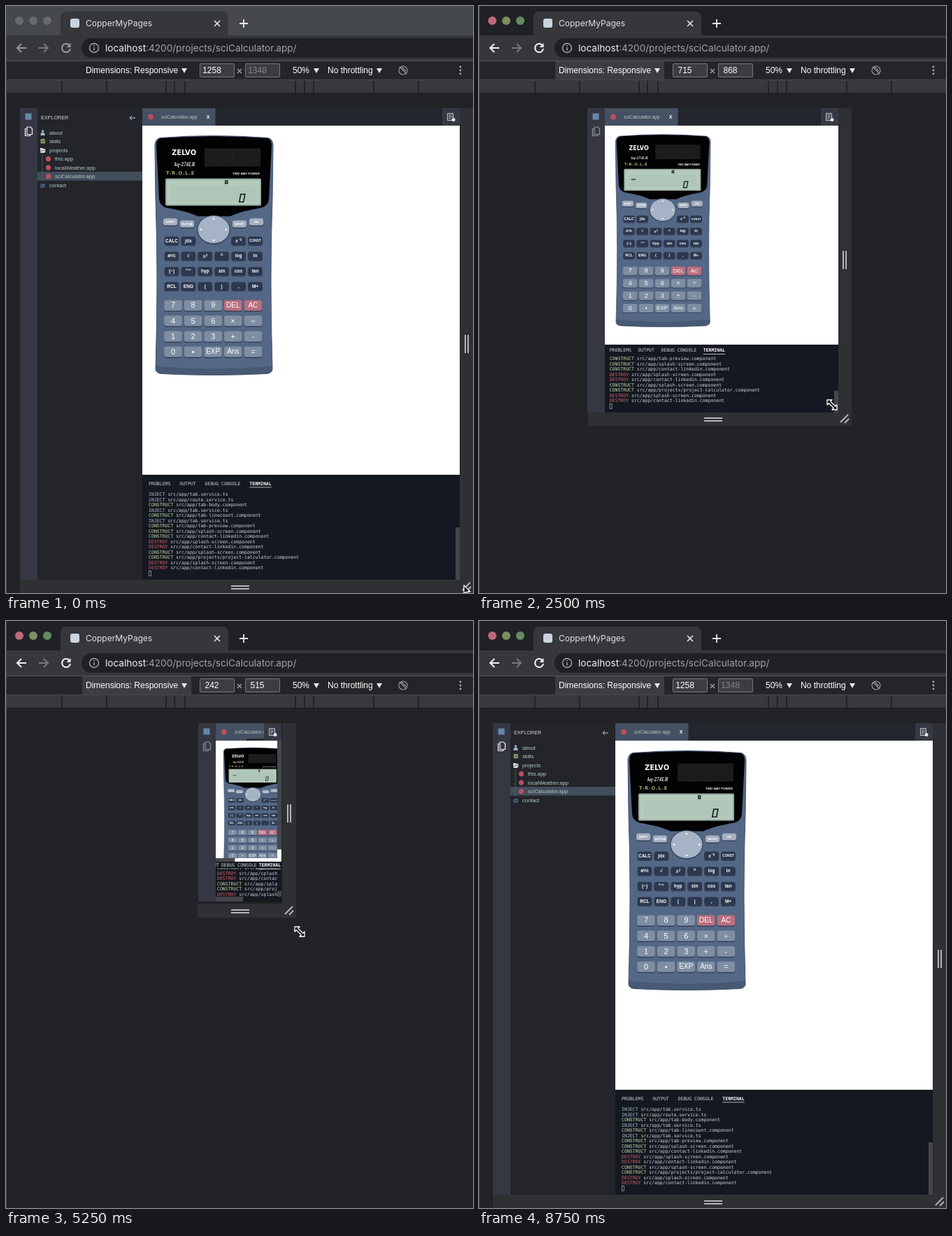
Animation of 668 by 839 pixels, one loop 9750 ms. Source, as an HTML page with a canvas:

```html
<!DOCTYPE html>
<html lang="en">
<head>
<meta charset="utf-8">
<style>
html, body { margin: 0; width: 668px; height: 839px; overflow: hidden; background: #222326; }
canvas { display: block; }
</style>
</head>
<body>
<canvas id="stage" width="668" height="839"></canvas>
<script>
const c = document.getElementById('stage').getContext('2d');
const LOOP = 9750, STEP = 250, TOP = 146, MID = 334.5;
const SANS = '"Liberation Sans", Arial, sans-serif';
const UI = 'Inter, sans-serif';
const MONO = '"DejaVu Sans Mono", monospace';

// time, viewport width, height, page lag, unpainted gap, layout offset x, y, pointer x, y
const KEYS = [
  [0, 1258, 1348, 0, 0, 0, 0, 660, 834],
  [1250, 1258, 1348, 0, 0, 0, 0, 659, 830],
  [1500, 1180, 1290, 0, 0, 0, 0, 632, 786],
  [2000, 858, 986, 0, 0, 0, 0, 545, 622],
  [2500, 715, 868, 2, 0, 0, 0, 505, 570],
  [3250, 470, 695, 5, 0, 0, 0, 450, 494],
  [3750, 360, 624, 2, 0, 0, 0, 424, 464],
  [4750, 205, 484, 0, 0, 0, 0, 396, 418],
  [5250, 242, 515, -3, 0, 0, 0, 420, 444],
  [6250, 631, 865, -8, 9, 8, 0, 515, 616],
  [7250, 1066, 1194, 0, 0, 8, 5, 631, 779],
  [7500, 1170, 1246, 0, 0, 8, 5, 654, 806],
  [7750, 1258, 1348, 0, 0, 0, 0, 680, 850]
];

const LOG = `I tab.service.ts|I route.service.ts|C tab-body.component|I tab.service.ts|C tab-linecount.component
I tab.service.ts|C tab-preview.component|C splash-screen.component|C contact-linkedin.component
D splash-screen.component|D contact-linkedin.component|C splash-screen.component
C projects/project-calculator.component|D splash-screen.component|D contact-linkedin.component`.split(/[|\n]/);
const WORDS = { I: ['INJECT', '#a9c4d0'], C: ['CONSTRUCT', '#c3d8a6'], D: ['DESTROY', '#d2606c'] };

function pose(t) {
  const i = KEYS.findIndex(k => k[0] > t);
  if (i < 0) return KEYS[KEYS.length - 1].slice(1);
  const a = KEYS[i - 1], b = KEYS[i], u = (t - a[0]) / (b[0] - a[0]);
  return a.map((v, n) => v + (b[n] - v) * u).slice(1);
}

function box(x, y, w, h, color, r = 0) {
  c.fillStyle = color;
  c.beginPath();
  c.roundRect(x, y, Math.max(0, w), Math.max(0, h), r);
  c.fill();
}

function oval(x, y, rx, ry, color) {
  c.fillStyle = color;
  c.beginPath();
  c.ellipse(x, y, rx, ry, 0, 0, 7);
  c.fill();
}

function line(d, color, width = 1) {
  c.strokeStyle = color;
  c.lineWidth = width;
  c.stroke(new Path2D(d));
}

function shape(d, color) {
  c.fillStyle = color;
  c.fill(new Path2D(d));
}

function text(s, x, y, font, color, align = 'left') {
  c.font = font;
  c.fillStyle = color;
  c.textAlign = align;
  c.textBaseline = 'middle';
  c.fillText(s, x, y);
}

function clipped(x, y, w, h, draw) {
  c.save();
  c.beginPath();
  c.rect(x, y, Math.max(0, w), Math.max(0, h));
  c.clip();
  draw();
  c.restore();
}

function browser(active, w, h) {
  box(0, 0, 668, 839, '#222326');
  box(0, 0, 668, 42, active ? '#202124' : '#46494c');
  const lights = active ? ['#bd6a7c', '#7c8f62', '#668a62'] : Array(3).fill('#686b6e');
  lights.forEach((color, i) => oval(19 + 20 * i, 21, 6, 6, color));
  box(78, 8, 240, 44, '#36373b', 8);
  box(0, 42, 668, 36, '#36373b');
  box(92, 18, 13, 13, '#c9d4de', 3);
  text('CopperMyPages', 114, 25, '12px ' + UI, '#dfe1e5');
  line('M298 21l8 8m0-8l-8 8', '#e8eaed', 1.6);
  line('M340 19v12m-6-6h12', '#e8eaed', 1.8);
  const on = active ? '#f1f3f4' : '#97999d';
  line('M29 60H16m6-6l-6 6l6 6', on, 2);
  line('M47 60h13m-6-6l6 6l-6 6', '#76787c', 2);
  line('M90.500 56A6 6 0 1 0 92 61', on, 2);
  shape('M92.500 53v6h-6z', on);
  box(108, 46, 580, 28, '#202124', 14);
  line('M132.500 60a6.500 6.500 0 1 0-13 0a6.500 6.500 0 1 0 13 0M126 59v4.500M126 56v1.500', '#a5a8ac', 1.4);
  text('localhost', 142, 60.5, '13.6px ' + UI, '#f1f3f4');
  text(':4200/projects/sciCalculator.app/', 142 + c.measureText('localhost').width, 60.5, '13.6px ' + UI, '#a0a3a8');

  box(0, 78, 668, 28, '#242528');
  if (active) box(109, 79, 156, 26, '#3b3d40');
  box(0, 78, 668, 1, '#55575b');
  box(0, 105, 668, 1, '#46484c');
  text('Dimensions: Responsive', 114, 92.5, '12px ' + SANS, '#fff');
  text('50%', 410, 92.5, '12px ' + SANS, '#fff');
  text('No throttling', 460, 92.5, '12px ' + SANS, '#fff');
  for (const x of [251, 440, 530]) shape(`M${x} 89h8l-4 7z`, '#e4e6e9');
  [[277, w], [342, h]].forEach(([x, n]) => {
    box(x, 82, 50, 20, '#75787c', 2);
    box(x + 1, 83, 48, 18, '#3b3d41', 1);
    text(Math.round(n), x + 17.5, 92.5, '12px ' + SANS, n === 1348 ? '#85878b' : '#fff', 'center');
  });
  line('M331 90l6 6m0-6l-6 6', '#a5a8ac', 1.2);
  line('M574 92a6 6 0 1 0-12 0a6 6 0 1 0 12 0M563 87l10 10M566 87l6 6', '#96999d', 1.2);
  for (const y of [87, 92, 97]) oval(650, y, 1.4, 1.4, '#a5a8ac');

  box(0, 106, 668, 18, '#38393d');
  for (const x of [80, 144, 229, 241, 256, 414, 427, 440, 526, 590]) box(x - 1, 107, 2, 17, '#222326');
  box(0, 124, 668, 1, '#1f2023');
  box(0, 0, 1, 839, '#414957');
}

function grips(left, right, bottom) {
  box(left, TOP, right - left + 20, bottom - TOP + 20, '#2f3033');
  box(left, TOP, right - left, bottom - TOP, '#1f2023');
  const y = (TOP + bottom) / 2 - 13, g = '#b4b6b9';
  box(right + 7, y, 2, 26, g);
  box(right + 11, y, 2, 26, g);
  box(322, bottom + 8, 26, 2, g);
  box(322, bottom + 12, 26, 2, g);
  line(`M${right + 4} ${bottom + 15}l11-11m-5 12l6-6`, g, 2);
}

function docs(x, y, color, bg) {
  line(`M${x - 3} ${y - 3}h-2v10h7v-2`, color, 1.2);
  box(x - 3, y - 6, 8, 11, bg);
  line(`M${x - 2.5} ${y - 5.500}h5l2.500 2.500v8h-7.500z`, color, 1.2);
}

function explorer(x) {
  const leaf = '7.5px ' + SANS, green = '#b4cdc0';
  text('EXPLORER', x + 5, 160.5, '7.2px ' + SANS, '#d3d7db');
  line(`M${x + 140} 160h-8m3-3l-3 3l3 3`, '#c8ccd0', 1);
  box(x, 237, 150, 12.5, '#434d5c');
  line(`M${x + 7} 212v38`, '#54585f', 1);
  oval(x + 7.5, 179, 1.8, 1.8, '#9ab3c9');
  box(x + 4.5, 181, 6, 4, '#9ab3c9', [2, 2, 0, 0]);
  box(x + 4.5, 190, 6.5, 6.5, '#7d9a68', 1);
  line(`M${x + 6} 193l1.500 1.500l2.500-3`, '#26302a', 0.8);
  shape(`M${x + 4} 203h3l1 1h3v2h-5l-2 3zM${x + 6} 206.500h6l-2 3.500h-6z`, '#d5d8db');
  text('@', x + 3.5, 256.5, '8px ' + SANS, '#6fa0cd');
  ['about', 'skills', 'projects', 'this.app', 'localWeather.app', 'sciCalculator.app', 'contact'].forEach((s, i) => {
    const y = 181.5 + 12.5 * i, nested = i > 2 && i < 6;
    text(s, x + (nested ? 25 : 17), y, leaf, green);
    if (nested) oval(x + 15.5, y - 0.5, 3.6, 3.8, '#b9505c');
  });
}

function key(s, x, y, w, h, color, font) {
  box(x - w / 2, y - h / 2 + 1.5, w, h, 'rgba(25,34,52,.55)', 3);
  box(x - w / 2, y - h / 2, w, h, color, 3);
  text(s, x, y + 0.4, font, '#fff', 'center');
}

function calculator(x, y, s, blink) {
  c.save();
  c.translate(x, y);
  c.scale(s, s);
  const body = 'M7 2Q84-4 162 2Q169 4 169 13L168 90Q164 200 168 332Q168 338 160 339Q84 343 9 339Q1 338 1 332Q5 200 1 90L0 13Q0 4 7 2Z';
  shape(body, '#546784');
  shape('M1 328Q84 336 168 328V332Q168 338 160 339Q84 343 9 339Q1 338 1 332Z', '#485974');
  line(body, '#43526d', 1);
  shape('M8 2.500Q84-3 161 2.500Q167 4 167 13L163 90Q162 99 152 102Q122 107 108 114H61Q47 107 17 102Q7 99 6 90L2 13Q2 4 8 2.500Z', '#020203');

  text('ZELVO', 24, 23.5, 'bold 10px "DejaVu Sans", sans-serif', '#f4f4f4');
  text('kq-274LR', 28, 41, 'italic bold 7.2px "Liberation Serif", serif', '#e3e3e3');
  c.letterSpacing = '.9px';
  text('T-R.O.L.E', 16, 52.5, 'bold 6.6px "DejaVu Sans", sans-serif', '#a9aa78');
  c.letterSpacing = '0px';
  text('TWO WAY POWER', 111, 53, 'bold 4.4px ' + SANS, '#fff');
  box(71, 17, 80, 26, '#1d1b1d');
  for (let i = 1; i < 4; i++) box(71 + 20 * i, 17, 0.6, 26, '#2a272a');
  box(71, 30, 80, 0.6, '#2a272a');

  box(15, 60, 137, 39, '#98aba3', 2);
  box(17, 62, 133, 35, '#b4cabd', 1);
  box(23, 70, 121, 23, '#afc5b8');
  box(100, 62.5, 4.5, 5.5, '#222b29');
  box(101.5, 64, 1.5, 2, '#9eb2a7');
  line('M122.800 82.500h6l-2 11h-6z', '#111a18', 1.6);
  if (blink) box(28, 78, 8, 1.5, '#18211f');

  [['SHIFT', 22, 122], ['ALPHA', 46, 125], ['MODE', 121, 125], ['ON', 145, 122]].forEach(([s, x, y]) =>
    key(s, x, y, 20, 10, '#a6b0c1', 'bold 4.4px ' + SANS));
  oval(84, 133.5, 24, 21, '#3e4c65');
  oval(84, 133, 22.5, 19.5, '#a6b3c6');
  shape('M84 116l2 2.500h-4zM84 150l2-2.500h-4zM64.500 133l2.500-2v4zM103.500 133l-2.500-2v4z', '#fff');

  'CALC ∫dx . . x⁻¹ CONST aᵇ/c √ x² ^ log ln (−) °’” hyp sin cos tan RCL ENG ( ) , M+'.split(' ').forEach((s, i) => {
    if (s === '.') return;
    const font = s[0] === 'x' ? 'italic bold 8px "Liberation Serif", serif'
      : `bold ${s === 'CONST' ? 4.8 : 6.5}px ${SANS}`;
    key(s, 24 + 23.9 * (i % 6), 149 + 21.7 * Math.floor(i / 6), 20.5, 12, '#2c3850', font);
  });
  '7 8 9 DEL AC 4 5 6 × ÷ 1 2 3 + - 0 • EXP Ans ='.split(' ').forEach((s, i) =>
    key(s, 26 + 28.6 * (i % 5), 241.5 + 22.1 * Math.floor(i / 5), 25.5, 15,
      i === 3 || i === 4 ? '#b96f7e' : '#7f8ea3', `${s.length > 1 ? 10 : 11}px ${SANS}`));
  c.restore();
}

function terminal(x, right, top, bottom) {
  const w = right - x, h = bottom - top, pad = w * 0.02, char = 3.91;
  const tabs = ['PROBLEMS', 'OUTPUT', 'DEBUG CONSOLE', 'TERMINAL'];
  box(x, top, w, h, '#141820');
  const narrow = w < 150, gap = narrow ? 3 : Math.max(7, pad * 1.42);
  let tx = narrow ? right - 1 - 35 * char - 3 * gap : x + pad;
  const ty = top + 1 + h * 0.08;
  tabs.forEach((s, i) => {
    const last = i === 3;
    text(s, tx, ty, (last ? 'bold ' : '') + '6.5px ' + MONO, last ? '#fff' : '#ced1d5');
    if (last) box(tx, ty + 4.5, 8 * char, 0.8, '#dfe1e4');
    tx += s.length * char + gap;
  });

  const bar = w < 225 ? 7 : 0, viewTop = top + h * 0.16, view = bottom - viewTop - bar;
  const lastY = narrow ? bottom - 2.5 : bottom - 16.5 - bar * 0.55;
  clipped(x, viewTop, w - (bar ? 6 : 0), view, () => {
    LOG.forEach((s, i) => {
      const y = lastY - 7.5 * (LOG.length - 1 - i), [word, color] = WORDS[s[0]];
      const lx = x + (narrow ? 2 : pad), font = '6.5px ' + MONO;
      text(word, lx, y, font, color);
      text('src/app/' + s.slice(2), lx + (word.length + 1) * char, y, font, '#d2d5d8');
    });
    c.strokeStyle = '#9da4a6';
    c.lineWidth = 0.8;
    c.strokeRect(x + pad + 0.5, lastY + 4, 3, 7);
  });
  const thumb = view * view / 212;
  box(right - 6, bottom - bar - thumb, 6, thumb, '#43464b');
  if (bar) box(x, bottom - bar, w * w / 225, bar, '#43464b');
}

function page(left, right, bottom, wide, gap, ox, oy, scale, blink) {
  box(left, TOP, right - left, bottom - TOP, '#fff');
  right -= gap;
  bottom -= gap;
  clipped(left, TOP, right - left, bottom - TOP, () => {
    const x = left + (wide ? 175 : 25), r = right + ox, b = bottom + oy;
    const w = r - x, top = Math.round(b - (b - TOP) * 0.2226), rail = '#353843';
    box(left, TOP, 25, b - TOP, rail);
    box(left + 7.5, 153.5, 9, 9, '#6688a8');
    docs(left + 12.5, 178.5, wide ? '#f0f2f4' : '#8d929a', rail);
    if (wide) {
      box(left + 25, TOP, 150, b - TOP, '#23252b');
      explorer(left + 25);
    }

    box(x, TOP, w, 25, '#24262d');
    box(x, TOP, 104.5, 25, '#455062');
    oval(x + 12, 158.5, 3.8, 4, '#b9505c');
    text('sciCalculator.app', x + 27, 158.8, '6.8px ' + SANS, '#b4cbbd');
    text('X', x + 94, 158.8, 'bold 7px ' + SANS, '#fff', 'center');
    box(r - 25, TOP, 25, 25, '#363944');
    line(`M${r - 17.500} 153.500h8v10h-8zM${r - 16} 156h5m-5 2.500h5m-5 2.500h3`, '#c6cacf', 1);
    oval(r - 9, 162.5, 2.5, 2.5, '#e2e5e8');
    if (w < 130) box(r - 50, 168, 25, 3, '#2a2c32');

    box(x, 171, w, top - 171, '#fff');
    const over = w < 320 ? 5 : 0, room = top - 171 - over, tall = 11 + 341 * scale;
    clipped(x, 171, w, room, () => calculator(x + 4 + 14 * scale, 176.5 + 10 * scale, scale, blink));
    if (tall > room) {
      box(r - 6, 171, 6, room, '#fff');
      box(r - 6, 171, 6, room * room / tall, '#45484d');
    }
    if (over) {
      box(x, top - over, w, over, '#fff');
      box(x, top - over, w * w / 322, over, '#45484d');
    }
    clipped(x, top, w, b - top, () => terminal(x, r, top, b));
  });
}

function pointer(x, y, resizing) {
  c.save();
  c.translate(x, y);
  c.lineJoin = 'round';
  const d = resizing
    ? 'M-7-7H0L-2.300-4.700L4.700 2.300L7 0V7H0L2.300 4.700L-4.700-2.300L-7 0Z'
    : 'M-5-6V6L-2 3.500L0 8L2 7L0 3H4Z';
  shape(d, '#0c0c0c');
  line(d, '#fff', 1.3);
  c.restore();
}

function draw(now) {
  const t = Math.min(8750, Math.floor(now % LOOP / STEP) * STEP);
  const [w, h, lag, gap, ox, oy, px, py] = pose(t);
  const half = w / 4, bottom = TOP + h / 2;
  const scale = Math.min(1, Math.max(0.5, 0.5 + (h - 515) * 0.00086));
  const phase = t % 1000, blink = phase >= 250 && phase < 750;
  browser(t >= 500, w, h);
  grips(Math.round(MID - half), Math.round(MID + half), Math.round(bottom));
  page(Math.round(MID - half - lag / 2 - 0.1), Math.round(MID + half + lag / 2), Math.floor(bottom + lag * 0.6),
    w > 768, gap, ox, oy, scale, blink);
  if (t < 7750) pointer(px, py, t >= 1250);
  requestAnimationFrame(() => draw(performance.now()));
}
draw(performance.now());
</script>
</body>
</html>
```
